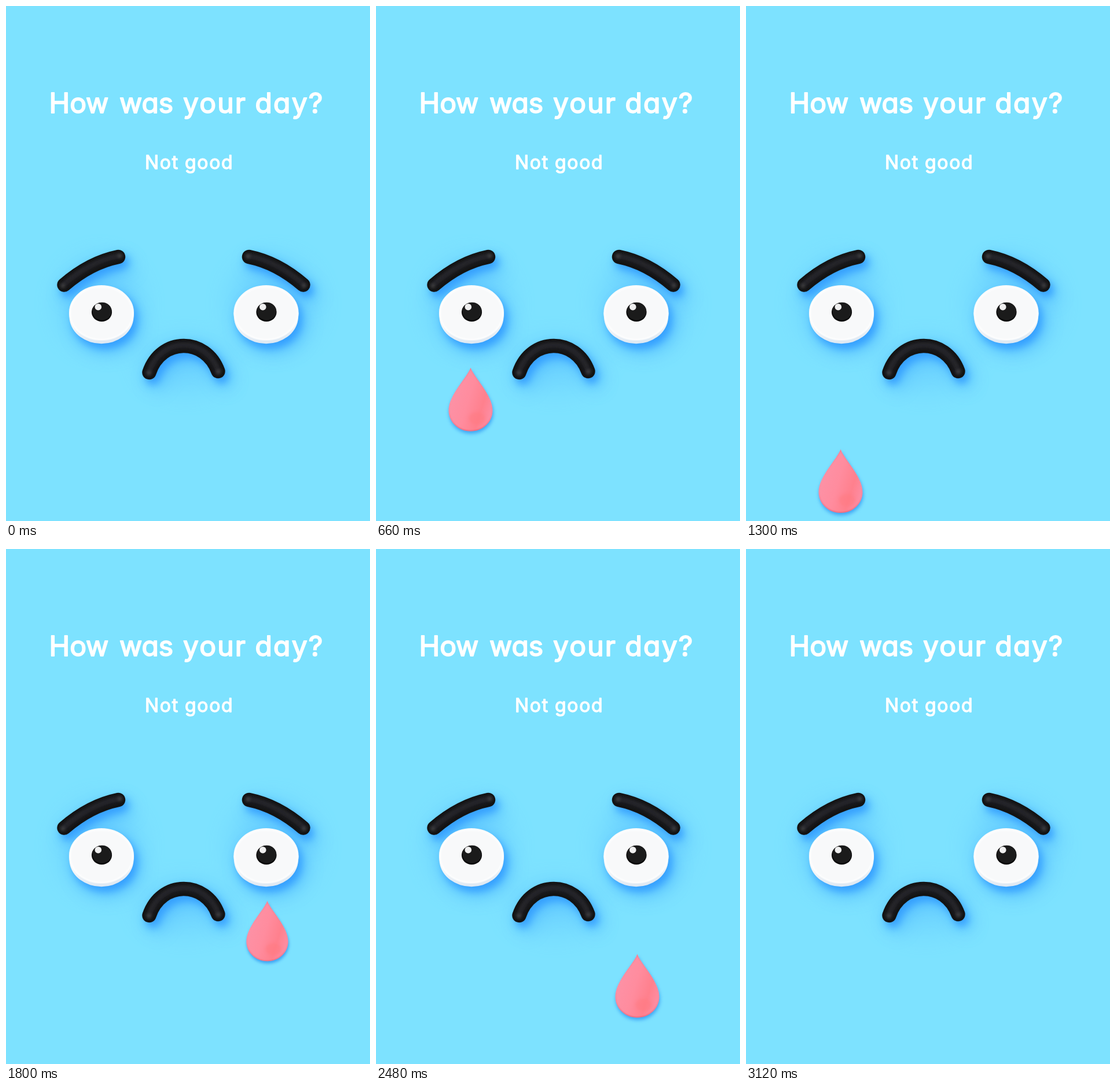
Recreate the animation shown at these times as an HTML page. Size 629 px wide and 891 px high, loop 3.48 s.

```html
<!DOCTYPE html>
<html lang="en">
<head>
<meta charset="utf-8">
<title>How was your day?</title>
<style>
  html, body { margin: 0; width: 100%; height: 100%; overflow: hidden; background: #7de2ff; }
  svg { display: block; width: 100%; height: 100%; }
  text {
    font-family: Inter, "Open Sans", sans-serif; font-weight: 400;
    font-feature-settings: "cv11"; /* single-storey a */
    fill: #fff; stroke: #fff; stroke-linejoin: round;
  }
  .title { font-size: 48px; stroke-width: 1.9px; }
  .answer { font-size: 32px; stroke-width: 1.3px; letter-spacing: 1.7px; }
  .wide { letter-spacing: 2.2px; }
  .raised { filter: drop-shadow(6px 9px 7px rgba(38, 145, 255, .72)) drop-shadow(7px 10px 13px rgba(48, 155, 255, .38)); }
  .tear { filter: drop-shadow(1.5px 4.5px 3px rgba(36, 140, 240, .72)); }
  .tube { fill: none; stroke-linecap: round; }
</style>
</head>
<body>
<svg viewBox="0 0 629 891" preserveAspectRatio="none">
  <defs>
    <filter id="soft" x="-50%" y="-80%" width="200%" height="260%"><feGaussianBlur stdDeviation="2.4"/></filter>
    <filter id="haze" x="-60%" y="-60%" width="220%" height="220%"><feGaussianBlur stdDeviation="20"/></filter>
    <filter id="fine" x="-30%" y="-30%" width="160%" height="160%"><feGaussianBlur stdDeviation="1.2"/></filter>
    <linearGradient id="side" x1="0" y1="0" x2=".25" y2="1">
      <stop offset=".5" stop-color="#f3f5f7"/>
      <stop offset="1" stop-color="#dfe9f3"/>
    </linearGradient>
    <linearGradient id="pink" x1="0" y1=".3" x2="1" y2=".75">
      <stop offset="0" stop-color="#fc93a8"/>
      <stop offset=".45" stop-color="#ff8c9e"/>
      <stop offset=".75" stop-color="#ff808d"/>
      <stop offset="1" stop-color="#fd8fa6"/>
    </linearGradient>
    <linearGradient id="rim" x1="0" y1="0" x2="0" y2="1">
      <stop offset="0" stop-color="#e8667c" stop-opacity=".4"/>
      <stop offset=".5" stop-color="#f39ab2" stop-opacity=".4"/>
      <stop offset="1" stop-color="#d9536c" stop-opacity=".8"/>
    </linearGradient>
    <path id="drop" d="M0-55C6-38 38-8 38 19C38 39 21 55 0 55S-38 39-38 19C-38-8-6-38 0-55Z"/>
    <clipPath id="dropClip"><use href="#drop"/></clipPath>
    <g id="eye">
      <g class="raised">
        <path d="M-56 0C-56 4-55.5 9-55 13A55.5 47 0 0 0 55 13C55.5 9 56 4 56 0Z" fill="url(#side)"/>
        <ellipse rx="56" ry="47.5" fill="#f8f9fa"/>
      </g>
      <ellipse rx="54" ry="45.5" cy="1" fill="none" stroke="#fff" stroke-width="2" filter="url(#fine)"/>
      <ellipse cx=".5" cy="-1" rx="17.6" ry="16.5" fill="#0a0a0a"/>
      <ellipse cx="1" cy="-2.5" rx="16.6" ry="15.2" fill="#1b1b1b"/>
      <circle cx="-5.7" cy="-9.8" r="5.8" fill="#efefef"/>
    </g>
    <g id="tear">
      <use href="#drop" fill="url(#pink)"/>
      <g clip-path="url(#dropClip)">
        <ellipse cx="11" cy="33" rx="14" ry="11" fill="#ff7980" opacity=".5" filter="url(#soft)"/>
        <use href="#drop" fill="none" stroke="url(#rim)" stroke-width="2" filter="url(#fine)"/>
      </g>
    </g>
  </defs>

  <rect width="629" height="891" fill="#7de2ff"/>
  <g fill="#62c9ff" filter="url(#haze)" opacity=".45">
    <ellipse cx="162" cy="515" rx="72" ry="80"/>
    <ellipse cx="462" cy="515" rx="77" ry="80"/>
    <ellipse cx="310" cy="622" rx="78" ry="45"/>
  </g>

  <text class="title" y="184.5"><tspan x="74.5">How</tspan> <tspan x="196">was</tspan> <tspan class="wide" x="306">your</tspan> <tspan class="wide" x="430.5">day?</tspan></text>
  <text class="answer" y="281.5"><tspan x="240">Not</tspan> <tspan x="309">good</tspan></text>

  <g id="tubes"></g>
  <use href="#eye" x="165" y="530.5"/>
  <use href="#eye" x="449.5" y="530.5"/>
  <g class="tear" id="leftTear"><use href="#tear"/></g>
  <g class="tear" id="rightTear"><use href="#tear"/></g>
</svg>
<script>
const LOOP = 3480, STEP = 20;
const GROW = 470, FALL_AT = 450, GONE = 1680;
const tears = [
  { node: document.getElementById("leftTear"), x: 163.5, start: 0 },
  { node: document.getElementById("rightTear"), x: 451.5, start: 1433 },
];

// A glossy tube: shadowed body, soft shine and a small glint at each end.
function tube(d, glints) {
  const shine = (color, width, shift) =>
    `<path class="tube" d="${d}" stroke="${color}" stroke-width="${width}" transform="translate(0 ${shift})" filter="url(#soft)"/>`;
  const spots = glints.map(([x, y]) =>
    `<circle cx="${x}" cy="${y}" r="4" fill="#555" opacity=".6" filter="url(#soft)"/>`).join("");
  return `<g class="raised"><path class="tube" d="${d}" stroke="#141414" stroke-width="24.5"/></g>`
    + shine("#1f1f20", 13, -1) + shine("#2c2c2d", 4, -2) + spots;
}

document.getElementById("tubes").innerHTML =
  tube("M100.5 482.5Q145 444 194 434", [[98, 484], [197, 432]]) +
  tube("M420 434Q469 444 513.5 482.5", [[418, 433], [515, 484]]) +
  tube("M247.5 634C268 573 345 573 366.5 632", [[247, 635], [367, 633]]);

function draw(time) {
  for (const { node, x, start } of tears) {
    const age = time - start;
    const visible = age > 0 && age < GONE;
    node.setAttribute("visibility", visible ? "visible" : "hidden");
    if (!visible) continue;
    const scale = 1 - (1 - Math.min(age / GROW, 1)) ** 2;
    const fall = (0.0348 * Math.max(age - FALL_AT, 0)) ** 1.5;
    node.setAttribute("transform", `translate(${x} ${661 + fall}) scale(${scale})`);
  }
}

const begin = performance.now();
function tick() {
  const time = (performance.now() - begin) % LOOP;
  draw(Math.floor(time / STEP) * STEP);
  requestAnimationFrame(tick);
}
tick();
</script>
</body>
</html>
```
